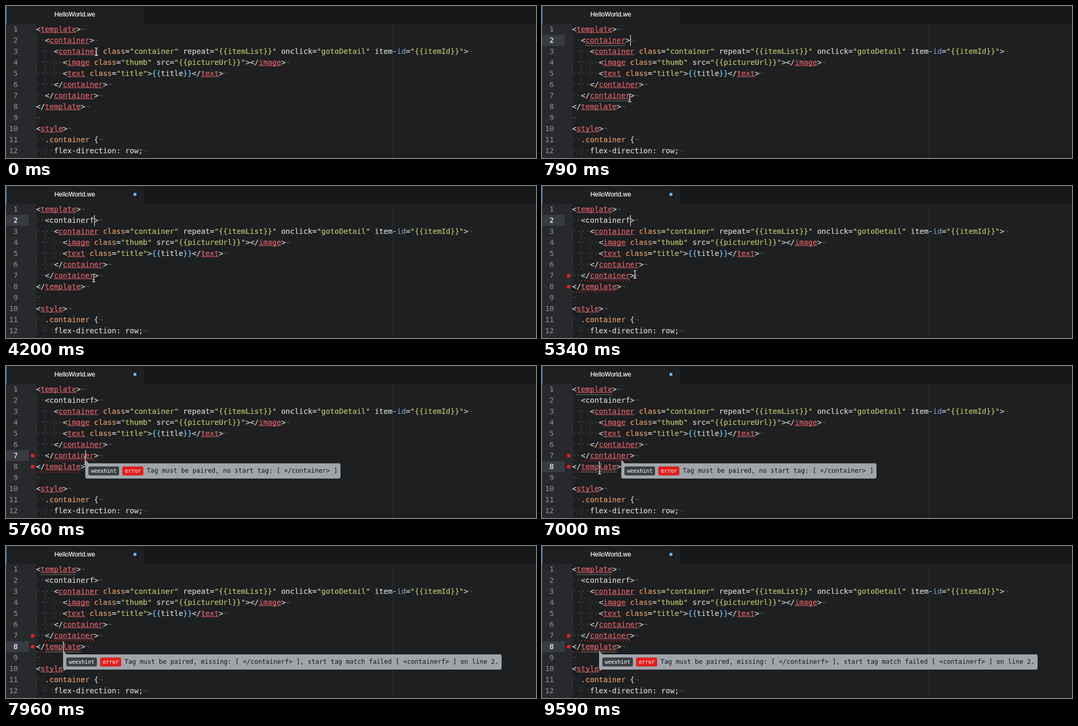
Animation, 1003 px wide and 289 px high, one loop 9850 ms. Source, as an HTML page:

```html
<!DOCTYPE html>
<html lang="en">
<head>
<meta charset="utf-8">
<title>Editor lint hints</title>
<style>
html, body { margin: 0; width: 100%; height: 100%; overflow: hidden; background: #1d1f21; }
div, svg { position: absolute; left: 0; top: 0; box-sizing: border-box; }
#stage { width: 1003px; height: 289px; overflow: hidden; color: #d4d7d6;
  font: 14px/21px "DejaVu Sans Mono", monospace; -webkit-text-stroke: 0.2px; }
#bar { width: 1003px; height: 34px; background: #17181a; border-bottom: 1px solid #111214; }
#tab { width: 261px; height: 34px; padding-right: 2px; background: #1d1f21; border-left: 1px solid #4a9df5;
  color: #fff; font: 12px/32px "Liberation Sans", Arial, sans-serif; text-align: center; }
#unsaved { left: 241px; top: 13px; width: 6px; height: 6px; border-radius: 50%; background: #6cb4fa; }
#gutter { top: 34px; width: 57px; height: 255px; background: #27292c; }
#wrap { left: 731px; top: 34px; width: 1px; height: 255px; background: #2b2d30; }
.num { width: 22.5px; text-align: right; color: #7f848b; }
#current { width: 43px; height: 21px; background: #383b42; }
.guide { width: 1px; height: 21px; background: #36383b; }
.row, .tip { white-space: pre; }
.r { color: #e2636a; text-decoration: underline; text-decoration-skip-ink: none; }
.o { color: #e5a068; }
.g { color: #b9c76b; }
.b { color: #6cc5f0; }
.i { color: #7a9fc4; }
.d { color: #46484b; }
.line { height: 1px; }
.pair { background: repeating-linear-gradient(90deg, #b4d0a8 0 1px, transparent 1px 2px); }
.lint { background: repeating-linear-gradient(90deg, #e0211d 0 3px, transparent 3px 6px); }
.spot { width: 7px; height: 7px; border-radius: 50%; background: #e0211d; }
#caret { width: 1px; height: 21px; background: #fff; }
.tip { height: 29px; padding-left: 6px; border-radius: 4px; background: #a0a5ab; color: #15171a;
  font-size: 12px; line-height: 29px; -webkit-text-stroke: 0; }
.tip::before { content: ""; position: absolute; left: 0; top: -7px; width: 7px; height: 11px;
  background: inherit; clip-path: polygon(0 0, 100% 70%, 100% 100%, 0 100%); }
.tip span { display: inline-block; height: 17px; margin-right: 6px; padding: 0 5px; border-radius: 3px;
  background: #3b4047; color: #fff; font-size: 10px; line-height: 17px; }
.tip .err { background: #e0211d; }
#mouse { width: 12px; height: 20px; }
</style>
</head>
<body>
<div id="stage">
  <div id="bar"></div>
  <div id="tab">HelloWorld.we</div>
  <div id="unsaved"></div>
  <div id="gutter"></div>
  <div id="current"></div>
  <div id="code"></div>
  <div id="wrap"></div>
  <div id="caret"></div>
  <div id="tips"></div>
  <svg id="mouse" viewBox="-6 -10 12 20" fill="none">
    <path id="beam" d="M-3-7.5Q0-7.5 0-5.5Q0-7.5 3-7.5M0-5.5V5.5M-3 7.5Q0 7.5 0 5.5Q0 7.5 3 7.5M-1.5 3H1.5"/>
    <use href="#beam" stroke="#111" stroke-width="2.6"/>
    <use href="#beam" stroke="#fff" stroke-width="1.2"/>
  </svg>
</div>
<script>
const LOOP = 9850, TYPED = 3300, LINTED = 4380, BLINK = 400;
const $ = id => document.getElementById(id);
const colX = n => Math.round(57 + n * 8.43);
const rowY = n => 13 + 21 * n;
const clamp = v => Math.max(0, Math.min(1, v));

// "~" plus a letter starts a run of that colour class
const rows = [
  "<~rtemplate~w>",
  "  <~rcontainer~w>",
  '    <~rcontainer~o class~w=~g"container"~w repeat=~g"{{itemList}}"~w onclick=~g"gotoDetail"~w item-~iid~w=~g"{{itemId}}"~w>',
  '      <~rimage~o class~w=~g"thumb"~w src=~g"{{pictureUrl}}"~w></~rimage~w>',
  '      <~rtext~o class~w=~g"title"~w>~b{{~wtitle~b}}~w</~rtext~w>',
  "    </~rcontainer~w>",
  "  </~rcontainer~w>",
  "</~rtemplate~w>",
  "",
  "<~rstyle~w>",
  "  ~o.container~w {",
  "    flex-direction: row;"
];
const esc = s => s.replace(/</g, "&lt;");
const indent = row => row.search(/\S|$/);
const paint = row => {
  const n = indent(row);
  const runs = `d${"·".repeat(n)}~w${row.slice(n)}~d¬`.split("~");
  return runs.map(s => `<span class="${s[0]}">${esc(s.slice(1))}</span>`).join("");
};

const add = (parent, cls, x, y, width, html = "") => {
  const el = document.createElement("div");
  el.className = cls;
  el.style.cssText = `left:${x}px;top:${y}px;${width ? `width:${width}px` : ""}`;
  el.innerHTML = html;
  return $(parent).appendChild(el);
};

const nums = [], lines = [];
rows.forEach((row, i) => {
  const y = rowY(i + 1);
  nums.push(add("code", "num", 0, y, 0, i + 1));
  for (let c = 0; c < indent(row); c += 2) add("code", "guide", colX(c), y);
  lines.push(add("code", "row", 57, y, 0, paint(row)));
});

// elements visible only within [from, to)
const timed = [];
const during = (from, to, ...els) => els.forEach(el => timed.push({ from, to, el }));
const underline = (cls, row, a, b) =>
  add("code", "line " + cls, colX(a), rowY(row) + 20, colX(b) - colX(a));
const tip = (row, x, width, text) => add("tips", "tip", x, rowY(row) + 25, width,
  `<span>weexhint</span><span class="err">error</span>${esc(text)}`);

for (const row of [7, 8]) {
  const n = indent(rows[row - 1]), end = rows[row - 1].replace(/~./g, "").length - 1;
  during(LINTED, LOOP, underline("lint", row, n, end), add("code", "spot", 47, rowY(row) + 7));
}
during(320, TYPED, underline("pair", 2, 3, 12), underline("pair", 7, 4, 13));
during(7000, LOOP, underline("pair", 1, 1, 9), underline("pair", 8, 2, 10));
during(5760, 7060, tip(7, 150, 483, "Tag must be paired, no start tag: [ </container> ]"));
during(7060, LOOP, tip(8, 108, 830,
  "Tag must be paired, missing: [ </containerf> ], start tag match failed [ <containerf> ] on line 2."));

// caret moves: time, column, row; the last one leaves the view
const places = [[320, 13, 2], [2700, 12, 2], [TYPED, 13, 2], [5700, 11, 7], [7000, 6, 8], [9590, -9, 8]];

// mouse moves: start, duration, x, y
const moves = [[0, 1, 171, 87], [60, 220, 166, 67], [560, 230, 166, 175], [4980, 300, 176, 168],
  [5400, 300, 150, 180], [6180, 170, 106, 208], [6940, 60, 109, 198], [7540, 180, 629, 246], [7900, 60, 746, 264]];
const mouseAt = t => moves.slice(1).reduce(([x, y], [start, span, toX, toY]) => {
  const k = clamp((t - start) / span), e = k * k * (3 - 2 * k);
  return [x + (toX - x) * e, y + (toY - y) * e];
}, moves[0].slice(2));

const show = (el, on) => { el.style.display = on ? "block" : "none"; };
const place = (el, x, y) => { el.style.left = x + "px"; el.style.top = y + "px"; };

let edited = false;
function draw(t) {
  for (const { from, to, el } of timed) show(el, t >= from && t < to);

  if (edited !== (t >= TYPED)) {
    edited = !edited;
    lines[1].innerHTML = paint(edited ? "  <containerf>" : rows[1]);
  }
  $("unsaved").style.opacity = clamp((t - 3540) / 180);

  const [since, col, row] = places.filter(p => p[0] <= t).pop() || [0, -9, 0];
  // solid for a moment after each move, then blinking
  show($("caret"), Math.floor((t - since - 80) / BLINK) % 2 === 0 || t - since < 80);
  place($("caret"), colX(col), rowY(row));
  show($("current"), row);
  place($("current"), 0, rowY(row));
  nums.forEach((n, i) => { n.style.color = i + 1 === row ? "#f0f2f5" : ""; });

  const [x, y] = mouseAt(t);
  show($("mouse"), t < 7960);
  place($("mouse"), x - 6, y - 10);
}

const start = performance.now();
function tick() {
  draw((performance.now() - start) % LOOP);
  requestAnimationFrame(tick);
}
tick();
</script>
</body>
</html>
```
